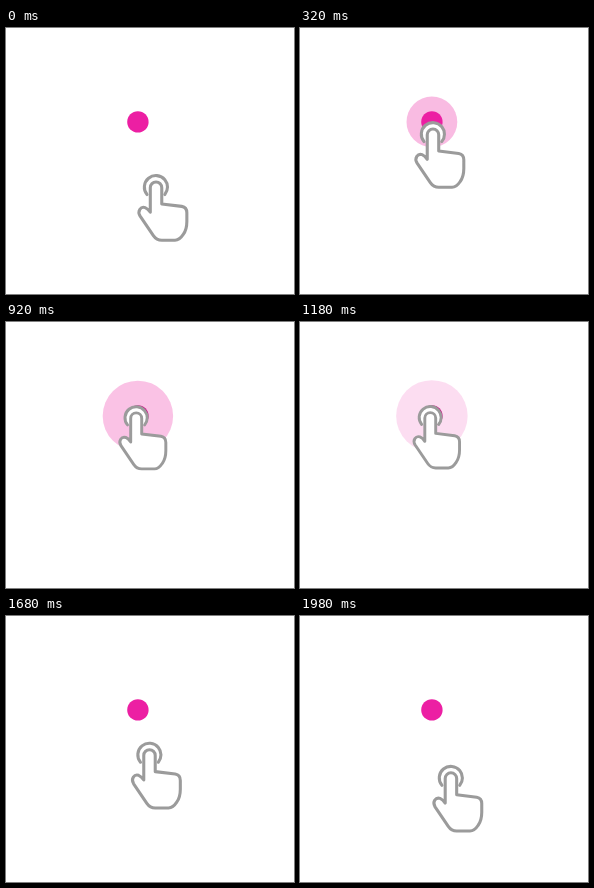
Recreate the animation shown at these times as an HTML page with a canvas. Size 288 by 266 pixels, loop 2 s.

```html
<!DOCTYPE html>
<html>
<head>
<meta charset="utf-8">
<title>Tap</title>
<style>
html, body { margin: 0; width: 100%; height: 100%; overflow: hidden; background: #fff; }
canvas { display: block; }
</style>
</head>
<body>
<canvas id="stage" width="288" height="266"></canvas>
<script>
const ctx = document.getElementById('stage').getContext('2d');
const LOOP = 2000;
const DOT = { x: 131.9, y: 93.9, r: 10.7 };
const ANCHOR = { x: 160.8, y: 147.5 };
const SIZE = 1.024;
const GREY = '#9b9b9b';

const hand = new Path2D(
  'M123.8 118.5 V94.6 A5.6 5.6 0 0 1 135 94.6 V110.4 L154.5 112.8 ' +
  'Q159.5 113.8 159.5 119 V127.5 C159.5 133.5 158.3 137 156 140.2 ' +
  'C153.5 144 151.5 145.9 148 145.9 H135 C131 145.9 128.8 144.2 126.8 141.3 ' +
  'L113.9 122.3 C110.8 117.3 114.6 112.6 118.8 114 Q121.4 115 123.8 118.5 Z');
const ring = new Path2D();
ring.arc(129.3, 94, 11.3, Math.PI * 0.78, Math.PI * 2.22);

const ramp = (t, a, b) => Math.min(1, Math.max(0, (t - a) / (b - a)));
const smooth = p => p * p * (3 - 2 * p);
const easeInOut = p => p < 0.5 ? 2 * p * p : 1 - 2 * (1 - p) * (1 - p);

// Vertical distance of the hand from its pressed position
function distance(t) {
  if (t > 1220) return 69.3 * easeInOut(ramp(t, 1220, 2000));
  const swoop = 50.5 * Math.exp(-Math.pow(t / 166, 1.3));
  const settle = 16 * Math.pow(1 - ramp(t, 0, 1220), 2);
  return swoop + settle;
}

function disc(r, color) {
  ctx.fillStyle = color;
  ctx.beginPath();
  ctx.arc(DOT.x, DOT.y, r, 0, Math.PI * 2);
  ctx.fill();
}

function drawHand(d, scale) {
  ctx.save();
  ctx.translate(ANCHOR.x + d * 0.322, ANCHOR.y + d);
  ctx.scale(scale, scale);
  ctx.translate(-ANCHOR.x, -ANCHOR.y);
  ctx.fillStyle = '#fff';
  ctx.strokeStyle = GREY;
  ctx.lineWidth = 3;
  ctx.lineCap = ctx.lineJoin = 'round';
  for (const shape of [ring, hand]) {
    ctx.fill(shape);
    ctx.stroke(shape);
  }
  ctx.restore();
}

function draw(t) {
  const press = smooth(ramp(t, 400, 1150)) * (1 - smooth(ramp(t, 1200, 1480)));
  const dim = Math.sqrt(press);
  const alpha = 0.3 * (1 - ramp(t, 860, 1500));
  const ripple = 36 * (1 - Math.exp(-(t - 40) / 230));

  ctx.fillStyle = '#fff';
  ctx.fillRect(0, 0, 288, 266);
  if (ripple > DOT.r && alpha > 0) disc(ripple, `rgba(236,31,158,${alpha})`);
  disc(DOT.r, `rgb(${236 - 40 * dim},${31 - 14 * dim},${163 - 33 * dim})`);
  drawHand(distance(t), SIZE * (1 - 0.05 * press));
}

const start = performance.now();
function tick() {
  draw((performance.now() - start) % LOOP);
  requestAnimationFrame(tick);
}
tick();
</script>
</body>
</html>
```
